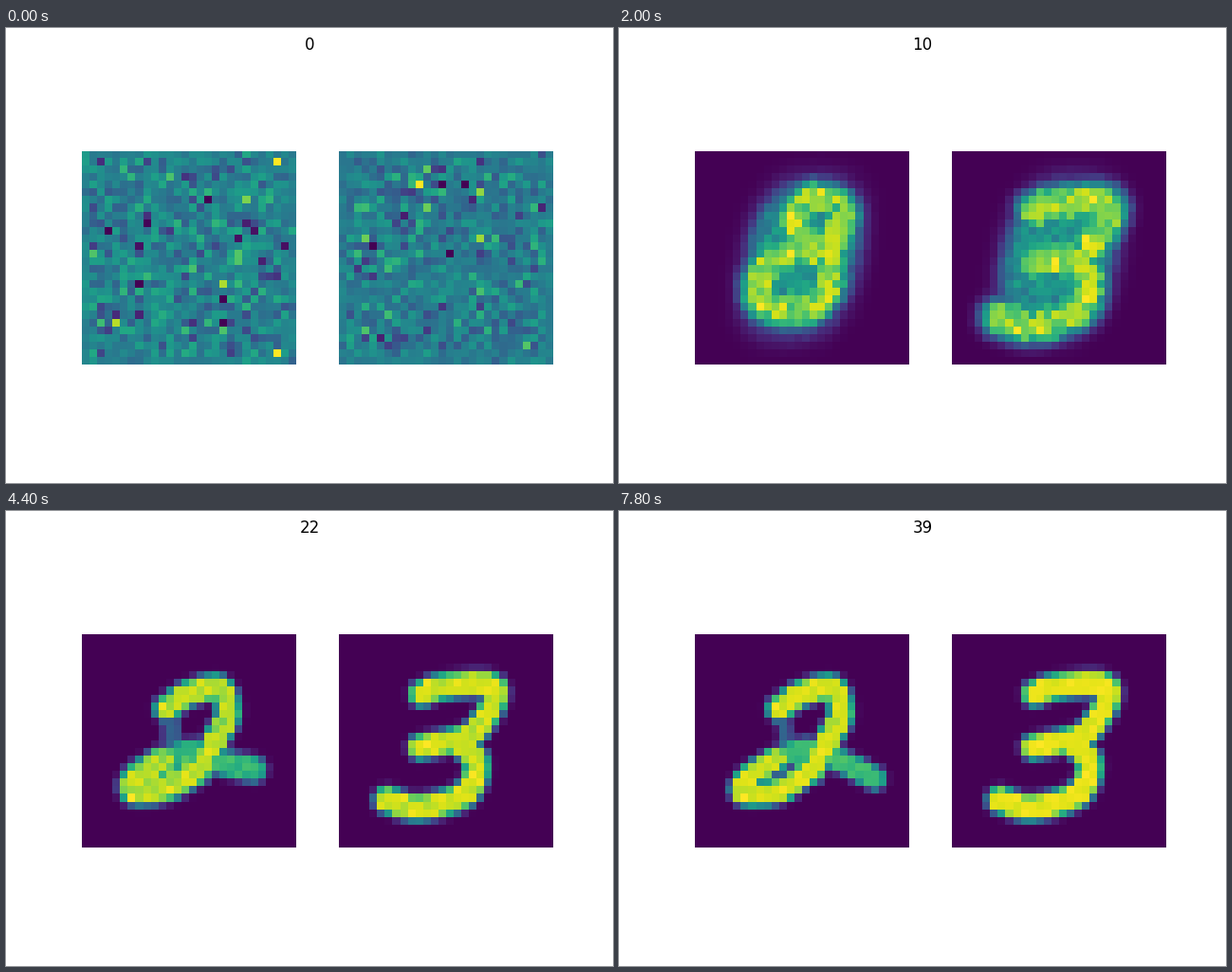
A matplotlib script for the animation above (8000 ms loop, 640x480 px).

```python
import numpy as np
import matplotlib.pyplot as plt
from matplotlib.animation import FuncAnimation

N = 28
FRAMES = 40
X, Y = np.meshgrid(np.arange(N) + 0.5, np.arange(N) + 0.5)

# Pen strokes in cell units: one "8", the parts of a "2" and of a "3".
EIGHT = [(16, 13.4), (13, 9.5), (15.5, 6.4), (19.2, 8), (17.6, 13), (17.5, 18),
         (14, 20.8), (9, 20), (8.9, 16), (12, 13.6)]
HOOK = [(11, 9.8), (14, 7.9), (18, 7.2), (19.1, 10.5), (17.6, 13.7), (15.3, 18)]
LOOP_EARLY = [(15, 18), (11, 19.8), (7.3, 20.4), (7.4, 18.9), (10.5, 16.8)]
LOOP_LATE = [(15, 18), (11, 20.6), (6.4, 20.9), (7, 18.9), (10.5, 16.5)]
ARM_EARLY = [(10.5, 16.8), (14, 15.8), (18, 17), (21.8, 17.2)]
ARM_LATE = [(10.5, 16.5), (14.5, 15.2), (19, 16.7), (23.4, 19)]
GHOST = [(11.5, 11), (11.8, 14.8)]
TOP = [(10.8, 7.9), (13.5, 7), (19.6, 6.7), (20.2, 9), (17.6, 13), (14.5, 14.1), (10.6, 14.9)]
BOWL = [(15.8, 14.2), (18, 17), (16.5, 21), (10.4, 22.8), (6.3, 21.8)]


def mix(a, b, t):
    return np.array(a) * (1 - t) + np.array(b) * t


def ease(t):
    return 1 - (1 - t) ** 2


def smooth(points, steps=16):
    """Catmull-Rom curve through the points."""
    p = np.array(points, float)
    p = np.vstack([2 * p[0] - p[1], p, 2 * p[-1] - p[-2]])
    t = np.linspace(0, 1, steps)[:, None]
    return np.vstack([
        0.5 * (2 * b + (c - a) * t + (2 * a - 5 * b + 4 * c - d) * t**2
               + (3 * b - a - 3 * c + d) * t**3)
        for a, b, c, d in zip(p, p[1:], p[2:], p[3:])])


def stroke(points, width, level=1.0, power=4):
    x, y = smooth(points).T[:, :, None, None]
    dist = np.hypot(X - x, Y - y).min(axis=0)
    return level * np.minimum(1.12 * np.exp(-(dist / width) ** power), 1)


def grain(seed, amount):
    return amount * np.random.default_rng(seed).standard_normal((N, N))


def blob_radius():
    """Leaning superellipse: below 1 inside the blob."""
    u = (X - 14 + 0.17 * (Y - 14)) / 7.3
    v = (Y - 14) / 9.8
    return (np.abs(u) ** 2.6 + np.abs(v) ** 2.6) ** (1 / 2.6)


RADIUS = blob_radius()


def static(seed, mean):
    """Heavy-tailed noise, calmer along the border."""
    noise = np.random.default_rng(seed).standard_t(4, (N, N))
    edge = np.minimum.reduce([X, Y, N - X, N - Y]) < 1
    return np.clip(mean + 0.085 * noise * np.where(edge, 0.4, 1), 0, 1)


def early_blob():
    rng = np.random.default_rng(7)
    ragged = RADIUS + grain(8, 0.06)
    body = 1 / (1 + np.exp(15 * (ragged - 0.98)))
    speckle = 1 + 0.13 * rng.standard_t(6, (N, N))
    dust = np.clip(rng.standard_normal((N, N)) - 0.9, 0, 1.2)
    img = body * (0.56 + 0.012 * (X - 14)) * speckle
    img += 0.16 * dust * np.exp(-2 * np.clip(RADIUS - 1, 0, None)) * (1 - body)
    return np.clip(img, 0, 1)


def soft(strokes, seed):
    body = 0.52 / (1 + np.exp(11 * (RADIUS - 0.98)))
    pen = np.maximum.reduce([stroke(s, 2.5, 0.85, 2.6) for s in strokes])
    return np.clip(np.maximum(body, pen) * (1 + grain(seed, 0.1)), 0, 1)


def sharp_two(t):
    img = np.maximum.reduce([
        stroke(HOOK, 1.7, 0.96),
        stroke(mix(LOOP_EARLY, LOOP_LATE, t), 2.05 - 0.45 * t, 0.95),
        stroke(mix(ARM_EARLY, ARM_LATE, t), 1.9 - 0.3 * t, 0.7),
        stroke(GHOST, 1.4 - 0.4 * t, 0.32),
    ])
    return img * (1 + grain(11, 0.06 - 0.03 * t))


def sharp_three(t):
    img = np.maximum(stroke(TOP, 1.7), stroke(BOWL, 1.75))
    return img * (1 + grain(12, 0.04 - 0.025 * t))


BLOB = early_blob()
PANELS = [
    (static(3, 0.4), BLOB, soft([EIGHT], 21), sharp_two),
    (static(4, 0.42), BLOB, soft([TOP, BOWL], 22), sharp_three),
]


def picture(stages, n):
    noise, blob, blur, sharp = stages
    if n < 3:
        img = mix(noise, blob, 1 - (1 - n / 3) ** 3)
    elif n < 10:
        img = mix(blob, blur, (n - 3) / 7)
    elif n < 18:
        img = mix(blur, sharp(0), ease((n - 10) / 8))
    else:
        img = sharp(ease((n - 18) / 21))
    return (img - img.min()) / (img.max() - img.min())


fig, axes = plt.subplots(1, 2, figsize=(6.4, 4.8), dpi=100)
images = []
for ax, stages in zip(axes, PANELS):
    images.append(ax.imshow(picture(stages, 0), cmap="viridis", vmin=0, vmax=1))
    ax.axis("off")
title = fig.suptitle("0", y=0.982)


def update(n):
    for image, stages in zip(images, PANELS):
        image.set_data(picture(stages, n))
    title.set_text(str(n))
    return [*images, title]


anim = FuncAnimation(fig, update, frames=FRAMES, interval=200, repeat=True, repeat_delay=0)
plt.show()
```
